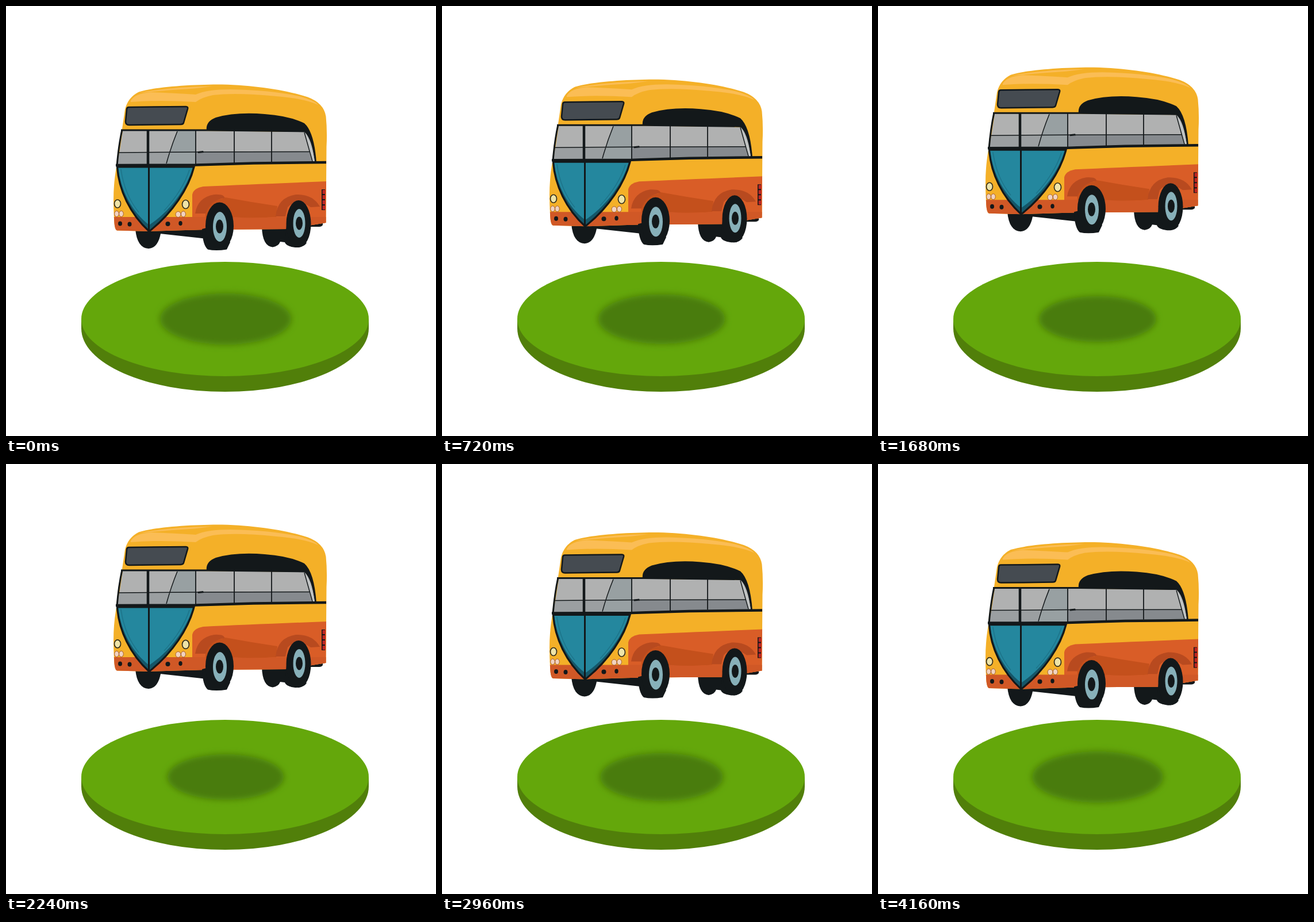
Recreate the animation shown at these times as an HTML page. Size 748 by 748 pixels, loop 4240 ms.

```html
<!DOCTYPE html>
<html lang="en">
<head>
<meta charset="utf-8">
<title>Floating bus</title>
<style>
  html, body { margin: 0; width: 100%; height: 100%; overflow: hidden; background: #fff; }
  svg { display: block; width: 100vw; height: 100vh; }
  .ink { fill: #13181a; }
  .line { fill: none; stroke: #13181a; }
  .yellow { fill: #f4b028; }
  .shine { fill: #fbbd55; }
  .orange { fill: #d95d27; }
  .rust { fill: #c4501c; }
  .arch { fill: #b84a1f; }
  .glass { fill: #b0b1b1; }
  .low { fill: #868a8e; }
  .hub { fill: #87b0b9; }
</style>
</head>
<body>
<svg viewBox="0 0 748 748">
  <defs>
    <filter id="soft" x="-20%" y="-40%" width="140%" height="180%">
      <feGaussianBlur stdDeviation="6"/>
    </filter>
    <clipPath id="shell">
      <path id="body" d="M193 390.500 Q188.500 389 188 370 Q186 335 188 312 Q189 298 192 280 Q194 245 202 214 L207 180 Q212 159 231 149.500 C262 140 325 136.500 376 136.500 C436 138 490 147 525 158.500 Q553 169 556.500 192 Q559 218 557.500 245 L556.500 377 L490 388 L345 389 L250 392 Z"/>
    </clipPath>
    <path id="nose" d="M193.500 280 H327 C318 316 290 360 249 392 C216 362 196 320 193.500 280 Z"/>
  </defs>

  <path fill="#517f0a" d="M131 545 V561 A250 110 0 0 0 631 561 V545 Z"/>
  <ellipse cx="381" cy="544.500" rx="250" ry="99.500" fill="#64a70b"/>
  <g id="shadow">
    <ellipse rx="114.500" ry="45" fill="#497b07" filter="url(#soft)"/>
  </g>

  <g id="bus">
    <g class="ink">
      <path d="M225 388 Q228 421 248 422 Q266 421 270 390 Z"/>
      <path d="M262 388 H350 V405 L268 396 Z"/>
      <path d="M445 384 Q446 418 464 419.500 Q474 418 477 410 L485 411 Q488 419 505 419 L510 384 Z"/>
      <path d="M525 375 H551 V381 Q549 384 545 384 H525 Z"/>
    </g>

    <use href="#body" class="yellow"/>
    <g clip-path="url(#shell)">
      <path class="shine" d="M217 165 Q224 152 252 150 Q300 152 330 154 Q350 145 390 145 Q460 146 510 157 Q536 164 543 172 Q520 161 470 157 Q400 150 360 155 Q340 159 330 167 Q265 163 217 167 Z"/>
      <path class="shine" d="M232 151 Q285 141 358 139.500 Q330 144 290 146 Z"/>
      <path class="orange" d="M324 395 V328 Q326 317 343 314 Q430 310 558 305 V395 Z"/>
      <path class="rust" d="M376 332 Q425 341 472 348 L470 367 Q430 370 390 368 Z"/>
      <path fill="#d05826" d="M186 367 H395 Q430 370 470 367 H558 V395 H186 Z"/>
      <path class="arch" d="M329 361 Q333 333 362 328 Q380 327 380 334 Q358 337 347 361 Z"/>
      <path class="rust" d="M347 361 Q356 337 378 335 Q393 347 396 368 H347 Z"/>
      <path class="arch" d="M469 366 Q472 333 504 328 Q534 327 546 349 L530 350 Q505 333 490 350 L486 366 Z"/>
    </g>

    <path class="ink" d="M349 216 Q347 201 365 194 Q400 184 450 188 Q493 191 519 204 Q536 219 540 272 L530 272 L519 219 Z"/>
    <path class="glass" d="M203 217 H330 L519 219 Q532 230 537 271 L330 275 L194 277 Z"/>
    <path class="low" d="M330 254 L530 253.500 L535 271 L330 274 Z"/>
    <path fill="#9b9fa1" d="M197 255 H330 V275 H194 Z"/>
    <path fill="#98a0a2" d="M298 217 H330 V275 H279 Z"/>
    <path fill="#c0c3c3" d="M519 220 Q531 232 537 270 L532 270 Z"/>
    <g class="line">
      <path stroke-width="1.500" d="M197 255 L330 254 L528 253.500 M298 218 Q287 245 279 274 M519 220 L533 270"/>
      <path stroke-width="1.800" d="M397 217 V273 M462 218 V271 M330 216 V275"/>
      <path stroke-width="3" d="M200 216 H352 L520 218 M202 215 Q196 243 193 278"/>
      <path stroke-width="4.500" d="M247 216 V277"/>
      <path stroke-width="4.500" d="M191 277 L330 276.500 L430 273.500 L557 272"/>
    </g>
    <path class="ink" d="M334 253 L343 252 L344 255 L334 256 Z"/>

    <path d="M214 176 L313 175 Q317 175 316 179 L309 203 Q308 206 304 206 L214 207 Q208 207 208 201 L210 180 Q210 176 214 176 Z" fill="#454b51" stroke="#13181a" stroke-width="2.500"/>

    <use href="#nose" fill="#155668"/>
    <path fill="#24879e" d="M195 280 H325 C316 314 287 356 249 381 C219 358 199 320 195 280 Z"/>
    <path d="M200 284 Q206 328 231 359 M319 285 Q308 320 275 356" fill="none" stroke="#1d748a" stroke-width="1.500"/>
    <use href="#nose" class="line" stroke-width="3.200"/>
    <path class="line" stroke-width="3" d="M248.500 279 V391"/>

    <g stroke="#332d1c" stroke-width="1.700" fill="#eee4a8">
      <ellipse cx="194" cy="344" rx="5.500" ry="7"/>
      <ellipse cx="312.500" cy="345" rx="6" ry="7.500"/>
    </g>
    <g fill="#f2d3bf" stroke="#a55b30" stroke-width="1">
      <ellipse cx="192.500" cy="361.500" rx="3.800" ry="5"/>
      <ellipse cx="200.500" cy="361.500" rx="3.800" ry="5"/>
      <ellipse cx="299.500" cy="362.500" rx="4.500" ry="5"/>
      <ellipse cx="308.500" cy="362" rx="4" ry="5"/>
    </g>
    <g class="ink">
      <ellipse cx="198.500" cy="378.500" rx="3.500" ry="4"/>
      <ellipse cx="215" cy="379.500" rx="3.500" ry="4"/>
      <ellipse cx="281.500" cy="379" rx="4" ry="4"/>
      <ellipse cx="303.500" cy="378" rx="3.200" ry="4"/>
      <path d="M549 319 H555 V355 H549 Z"/>
    </g>
    <path d="M553 320 V354" stroke="#bd2522" stroke-width="5" stroke-dasharray="7 2"/>

    <g class="ink">
      <path d="M341 388 Q342 416 351 423.500 Q365 426.500 384 423.500 L390 411 L371 380 Z"/>
      <ellipse cx="371.500" cy="382.500" rx="24.500" ry="41"/>
      <path d="M488 380 L485 409 Q489 419 503 420 Q518 420.500 523 412 Z"/>
      <ellipse cx="509" cy="379" rx="21.500" ry="41"/>
    </g>
    <g class="hub">
      <ellipse cx="372" cy="384" rx="12" ry="26"/>
      <ellipse cx="510" cy="378" rx="10.500" ry="25"/>
    </g>
    <g class="ink">
      <ellipse cx="371.500" cy="383.500" rx="6.500" ry="12"/>
      <ellipse cx="510" cy="378" rx="6" ry="11.500"/>
    </g>
  </g>
</svg>
<script>
  const LOOP = 4240, STEP = 80, PERIOD = 4000, DELAY = 20, LIFT = 32;
  const bus = document.getElementById('bus');
  const shadow = document.getElementById('shadow');
  const start = performance.now();

  function draw() {
    const elapsed = (performance.now() - start) % LOOP;
    const t = Math.floor(elapsed / STEP) * STEP;
    const rise = (1 - Math.cos(2 * Math.PI * (t - DELAY) / PERIOD)) / 2;
    bus.setAttribute('transform', `translate(0 ${-LIFT * rise})`);
    shadow.setAttribute('transform', `translate(382 544.5) scale(${1 - 0.115 * rise})`);
    requestAnimationFrame(draw);
  }
  draw();
</script>
</body>
</html>
```
